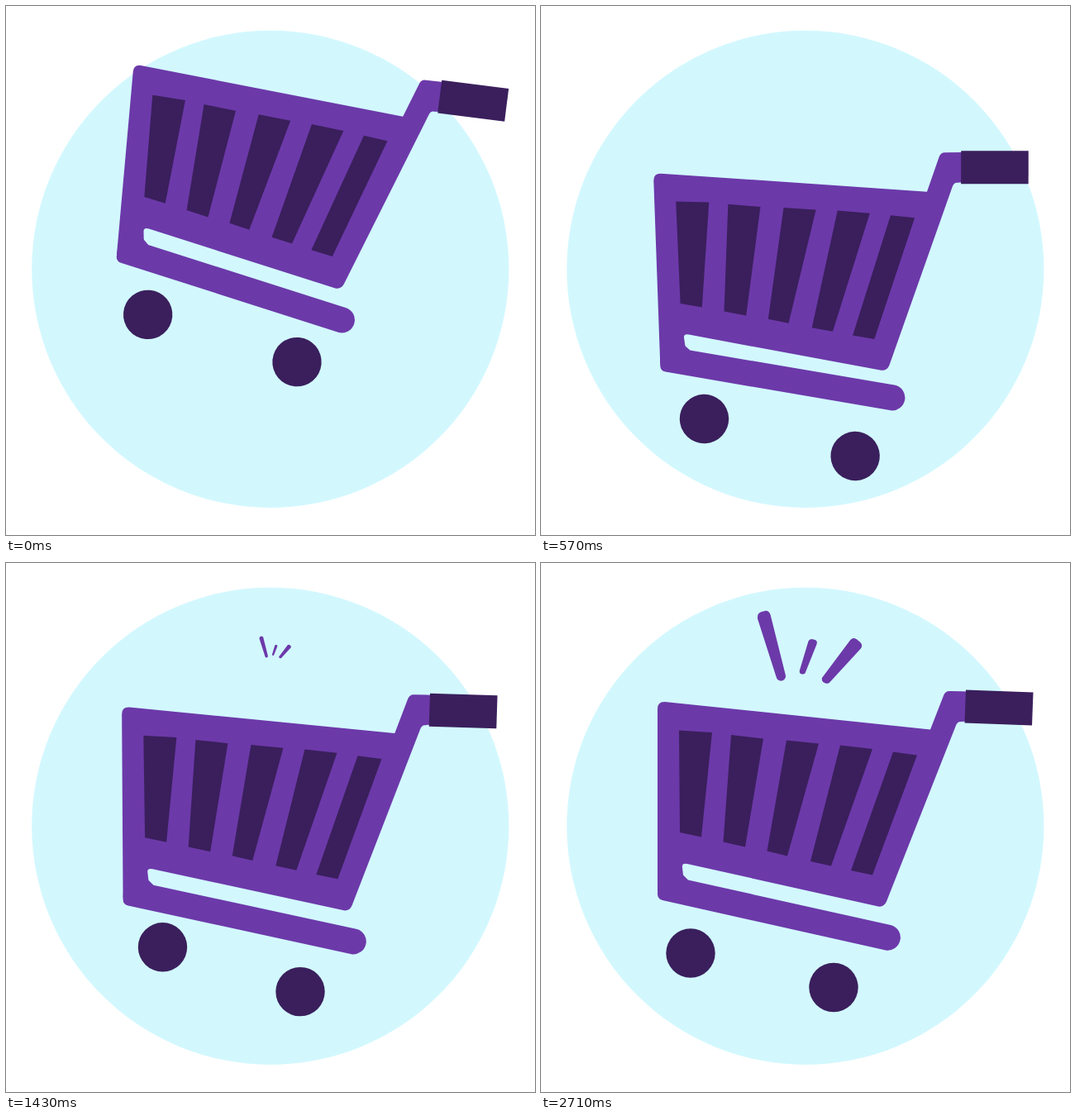
Recreate the animation shown at these times as an HTML page without scripts. Size 640 by 640 pixels, loop 2780 ms.

```html
<!DOCTYPE html>
<html lang="en">
<head>
<meta charset="utf-8">
<title>Bouncing cart</title>
<style>
  @property --t { syntax: "<number>"; inherits: true; initial-value: 0; }

  html, body { margin: 0; width: 100%; height: 100%; overflow: hidden; background: #fff; }

  /* --t counts the 39 drawings of the loop; the other variables are eased phases from 0 to 1. */
  svg {
    display: block; width: 100%; height: 100%;
    animation: tick 2.78s steps(39) -5ms infinite;
    --drop: calc(.5 - .5 * cos(180deg * clamp(0, var(--t) / 8, 1)));
    --splay: calc(.5 - .5 * cos(180deg * clamp(0, var(--t) / 5, 1)));
    --lean: calc(.5 - .5 * cos(180deg * clamp(0, (var(--t) - 5) / 6, 1)));
    --rise: calc(.5 - .5 * cos(180deg * clamp(0, (var(--t) - 9.6) / 5.1, 1)));
    --recover: calc(.5 - .5 * cos(180deg * clamp(0, (var(--t) - 11) / 9, 1)));
    --level: calc(.5 - .5 * cos(180deg * clamp(0, (var(--t) - 11) / 10.3, 1)));
    --trail: calc(.5 - .5 * cos(180deg * clamp(0, (var(--t) - 13) / 17, 1)));
    --sink: calc(.5 - .5 * cos(180deg * clamp(0, (var(--t) - 14.7) / 6.3, 1)));
    --pop: calc(.5 - .5 * cos(180deg * clamp(0, (var(--t) - 18) / 6, 1)));
    --lift: calc(.5 - .5 * cos(180deg * clamp(0, (var(--t) - 21) / 7.5, 1)));
    --shrink: calc(.5 - .5 * cos(180deg * clamp(0, (var(--t) - 24) / 6, 1)));
    --settle: calc(.5 - .5 * cos(180deg * clamp(0, (var(--t) - 28.5) / 9.5, 1)));
  }
  @keyframes tick { from { --t: 0; } to { --t: 39; } }

  .main { fill: #6c39a9; }
  .dark { fill: #3a1f5c; }

  .cart {
    transform-origin: 320px 315px;
    transform:
      translateY(calc(1px * (-85 + 110 * var(--drop) - 41 * var(--rise) + 19 * var(--sink)
        - 8.4 * var(--lift) + 1.9 * var(--settle))))
      rotate(calc(1deg * (5.1 - 14.3 * var(--lean) + 9.2 * var(--level))));
  }
  .bar {
    transform-origin: 143px 408px;
    transform: rotate(calc(-1.7deg * (var(--lean) - var(--recover))));
  }
  .rear {
    transform: translate(
      calc(1px * (4 + 13.7 * var(--lean) - 6.2 * var(--level) - 11.5 * var(--trail))),
      calc(1px * (-4.5 + 14.5 * var(--splay) - 31 * var(--lean) + 21 * var(--trail))));
  }
  .front {
    transform: translate(
      calc(1px * (15.7 + 2.5 * var(--drop) + 1.2 * var(--lean) - 19.4 * var(--level))),
      calc(1px * (-5 + 33 * var(--splay) - 47 * var(--lean) + 19 * var(--recover))));
  }
  .sparks {
    transform-origin: 326px 102px;
    transform: scale(calc(var(--pop) - .18 * var(--shrink)));
  }
</style>
</head>
<body>
<svg viewBox="0 0 640 640">
  <circle cx="319.8" cy="318.3" r="288.6" fill="#d2f8fe"/>
  <g class="sparks main">
    <path d="M248 60Q247 52 253 50L260 48Q265 48 267 54L289 142A6.5 6.5 0 0 1 276 147Z"/>
    <path d="M323 93Q325 89 329 90L333 91Q337 93 335 98L319 138A4.6 4.6 0 0 1 310 136Z"/>
    <path d="M385 91Q389 87 394 90L399 94Q404 99 400 104L354 154A7 7 0 0 1 343 147Z"/>
  </g>
  <g class="cart">
    <g class="main">
      <path d="M141 180Q141 171 150 171.5L471 205L487 164Q489 158 495 158.5L516 159V195L508 195.5Q504 195 502 200L418 413Q415 420 408 419L177 367.5Q170 366 171 372L172 381Q173 386 178 387.5L160 405L141 402Z"/>
      <path class="bar" d="M178 387L424 441.7A15.6 15.6 0 0 1 417 472L147 411.5Q141 410 141 404L142 384L171 380Z"/>
    </g>
    <g class="dark">
      <path d="M514 157L595.5 160L594 200L512.5 197Z"/>
      <path d="M167 206L207 208.5L194 335L168 329.5Z"/>
      <path d="M230 211.5L269 216L247 347L220.5 341Z"/>
      <path d="M297 218L336 222L298 358L273.5 352Z"/>
      <path d="M362 224L401 228.5L351 370L326 364.5Z"/>
      <path d="M426 232L455 236L401 381L375 375.5Z"/>
      <circle class="rear" cx="181" cy="475.5" r="29.7"/>
      <circle class="front" cx="354" cy="517" r="29.7"/>
    </g>
  </g>
</svg>
</body>
</html>
```
